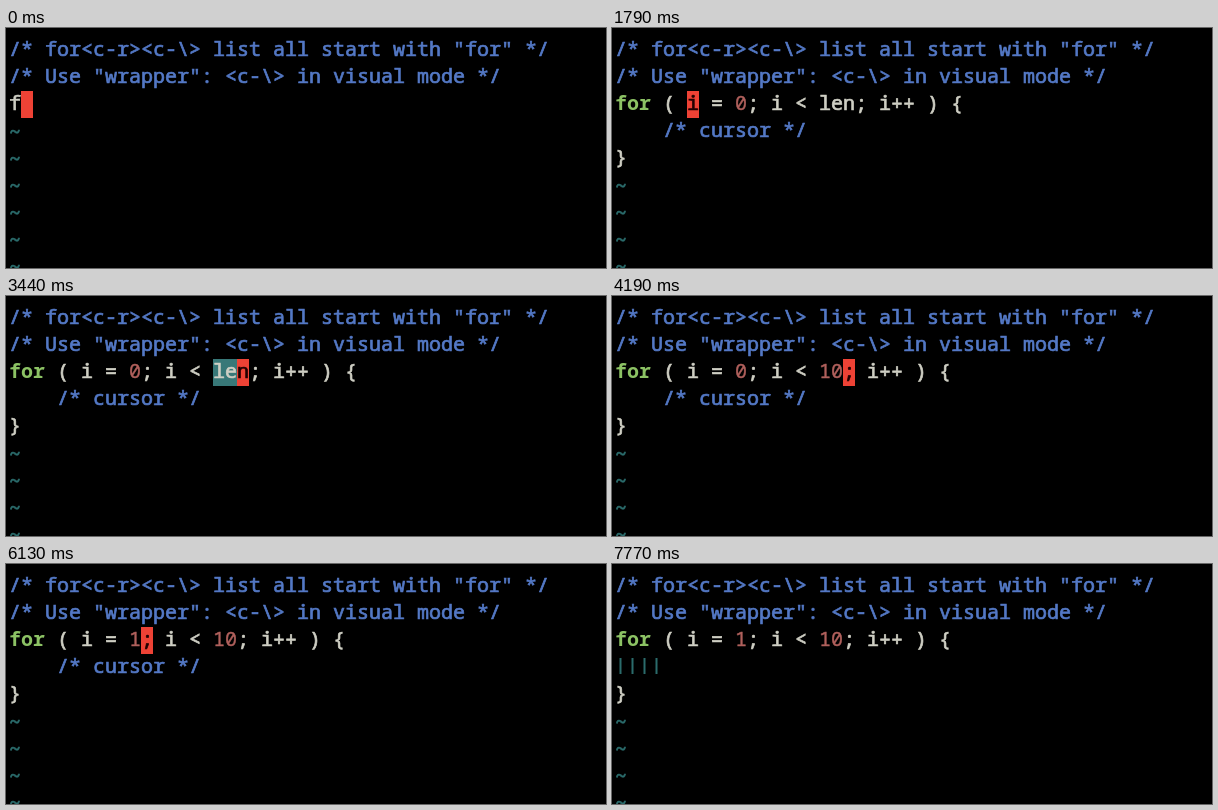
Write an HTML page that moves like this. It is 600 px wide and 240 px high and loops after 8000 ms.

```html
<!DOCTYPE html>
<html lang="en">
<head>
<meta charset="utf-8">
<title>Editor snippet</title>
<style>
  html, body { margin: 0; width: 600px; height: 240px; overflow: hidden; background: #000; }
  svg { display: block; }
  text { font: 500 20px "Noto Sans Mono", monospace; white-space: pre; fill: #cfcfc4; stroke: #cfcfc4; stroke-width: .7px; }
  .comment { fill: #5479c6; stroke: #5479c6; }
  .keyword { fill: #8cc264; stroke: none; font-weight: 700; }
  .number { fill: #b0605c; stroke: #b0605c; stroke-width: .4px; }
  .tilde { fill: #2b6c6c; stroke: #2b6c6c; }
  .guide { fill: #2b6c6c; }
  .select { fill: #387878; }
  .cursor { fill: #ee4235; }
  .under { fill: #200; stroke: #200; }
</style>
</head>
<body>
<svg id="screen" width="600" height="240"></svg>
<script>
const LOOP = 8000, COL = 12, ROW = 27, LEFT = 3, TOP = 9;
const screen = document.getElementById('screen');

const header = [
  '/* for<c-r><c-\\> list all start with "for" */',
  '/* Use "wrapper": <c-\\> in visual mode */'
];
const loop = (start, end, body = '    /* cursor */') =>
  [`for ( i = ${start}; i < ${end}; i++ ) {`, body, '}'];

// at: start time, cur: [column, row], sel: [first column, length], both in the typed lines
const steps = [
  { at: 0, lines: ['f'], cur: [1, 0] },
  { at: 150, lines: ['fo'], cur: [2, 0] },
  { at: 300, lines: ['for'], cur: [3, 0] },
  { at: 900, lines: ['for'] },
  { at: 1790, lines: loop(0, 'len'), cur: [6, 0] },
  { at: 2690, lines: loop(0, 'len') },
  { at: 2840, lines: loop(0, 'len'), cur: [10, 0] },
  { at: 3440, lines: loop(0, 'len'), cur: [19, 0], sel: [17, 3] },
  { at: 4040, lines: loop(0, 1), cur: [18, 0] },
  { at: 4190, lines: loop(0, 10), cur: [19, 0] },
  { at: 5230, lines: loop(0, 10), cur: [10, 0] },
  { at: 6130, lines: loop(1, 10), cur: [11, 0] },
  { at: 6730, lines: loop(1, 10), cur: [18, 0], sel: [17, 2] },
  { at: 7170, lines: loop(1, 10, ''), guides: 4 },
  { at: 7320, lines: loop(1, 10, ''), guides: 4, cur: [4, 1] },
  { at: 7770, lines: loop(1, 10, ''), guides: 4 }
];

const escape = s => s.replace(/&/g, '&amp;').replace(/</g, '&lt;');

const highlight = s => escape(s).replace(/(\/\*.*\*\/)|(\bfor\b)|(\d+)|~/g,
  (m, comment, keyword, number) => {
    const kind = comment ? 'comment' : keyword ? 'keyword' : number ? 'number' : 'tilde';
    return `<tspan class="${kind}" dy="${kind === 'tilde' ? 2 : 0}">${m}</tspan>`;
  });

const text = (col, row, content, kind = '') =>
  `<text class="${kind}" x="${LEFT + col * COL}" y="${TOP + row * ROW + 19}">${content}</text>`;

const block = (col, row, length, kind) =>
  `<rect class="${kind}" x="${LEFT + col * COL}" y="${TOP + row * ROW}" width="${length * COL}" height="${ROW}"/>`;

function render({ lines, cur, sel, guides = 0 }) {
  const rows = [...header, ...lines];
  while (rows.length < 9) rows.push('~');
  let out = sel ? block(sel[0], 2, sel[1], 'select') : '';
  rows.forEach((line, row) => out += text(0, row, highlight(line)));
  for (let i = 0; i < guides; i++)
    out += `<rect class="guide" x="${7.5 + i * COL}" y="94" width="2" height="16"/>`;
  if (cur) {
    const [col, row] = [cur[0], cur[1] + 2];
    out += block(col, row, 1, 'cursor') + text(col, row, escape(rows[row][col] || ''), 'under');
  }
  screen.innerHTML = out;
}

let shown;
function tick(now) {
  const t = now % LOOP;
  const step = steps.findLast(s => s.at <= t);
  if (step !== shown) render(shown = step);
  requestAnimationFrame(tick);
}
tick(0);
</script>
</body>
</html>
```
